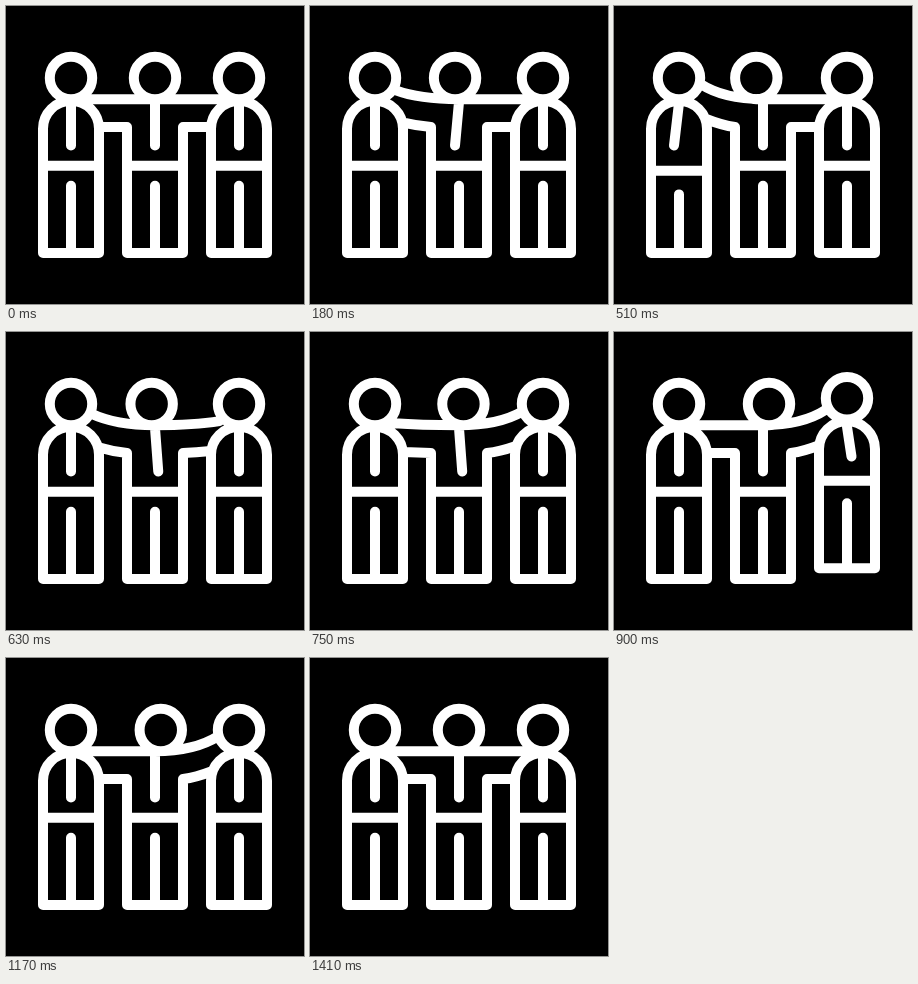
Write an HTML page that moves like this. It is 298 px wide and 298 px high and loops after 1500 ms.

```html
<!DOCTYPE html>
<html lang="en">
<head>
<meta charset="utf-8">
<title>Three friends</title>
<style>
  html, body { margin: 0; width: 100%; height: 100%; overflow: hidden; background: #000; }
  svg { display: block; width: 100vw; height: 100vh; }
  path { fill: none; stroke: #fff; stroke-width: 10; stroke-linecap: round; stroke-linejoin: round; }
</style>
</head>
<body>
<svg viewBox="0 0 298 298"><path id="art"/></svg>
<script>
const LOOP = 1500;
const DELAY = 510; // the right-hand friend hops this much after the left one
const art = document.getElementById('art');

// Eased value through [time, value] pairs
function track(t, keys) {
  if (t <= keys[0][0]) return keys[0][1];
  for (let i = 1; i < keys.length; i++) {
    const [t0, a] = keys[i - 1], [t1, b] = keys[i];
    if (t < t1) {
      const u = (t - t0) / (t1 - t0);
      return a + (b - a) * u * u * (3 - 2 * u);
    }
  }
  return keys[keys.length - 1][1];
}

const mix = (a, b, u) => a + (b - a) * u;

// Peak at the top of the hop, dip on landing, then settle
const hop = (t, peak, dip) => track(t, [[240, 0], [390, peak], [510, dip], [600, 0]]);

const swing = t => t > 30 && t < 330 ? 4 * Math.sin(Math.PI * (t - 30) / 300) : 0;

const head = (x, y) =>
  `M${x - 21.2} ${y}a21.2 21.2 0 1 1 42.4 0a21.2 21.2 0 1 1 -42.4 0Z`;

function friend(x, t) {
  const lift = hop(t, -5.7, 0);
  const foot = 247 + hop(t, -10.7, 0);
  const belt = 159.7 + hop(t, -11, 5);
  const leg = 179.7 + hop(t, -8.5, 8.7);
  const l = x - 28, r = x + 28, top = 122.8 + lift;
  return head(x, 72 + lift) +
    `M${l} ${foot}V${top}A28 28 0 0 1 ${r} ${top}V${foot}Z` +
    `M${l} ${belt}H${r}M${x} ${leg}V${foot}` +
    `M${x} ${97 + lift * 0.4}L${x + hop(t, 4.5, -5)} ${139.5 + hop(t, -15, 0)}`;
}

// Upper and lower lines of one arm; side is -1 for left, 1 for right
function arm(side, up) {
  const at = (dx, y) => `${149 + side * dx} ${y}`;
  return `M${at(0, 93.2)}Q${at(39.5, 93.2)} ${at(mix(65, 63, up), mix(93.2, 77.7, up))}` +
    `M${at(28, 121)}Q${at(41, mix(121, 119.3, up))} ${at(55.5, mix(121, 113.5, up))}`;
}

function draw(t) {
  const left = track(t, [[30, 0], [300, 1], [540, 1], [810, 0]]);
  const right = track(t, [[540, 0], [810, 1], [1140, 1], [1410, 0]]);
  const tie = swing(t - DELAY) - swing(t);
  art.setAttribute('d',
    friend(65, t) + friend(233, t - DELAY) +
    arm(-1, left) + arm(1, right) +
    head(149 - 6.7 * left + 6 * right, 72) +
    'M121 121V247H177V121M121 159.7H177M149 179.7V247' +
    `M149 96L${149 + tie} 139.5`);
}

const start = performance.now();
function tick() {
  draw((performance.now() - start) % LOOP);
  requestAnimationFrame(tick);
}
tick();
</script>
</body>
</html>
```
